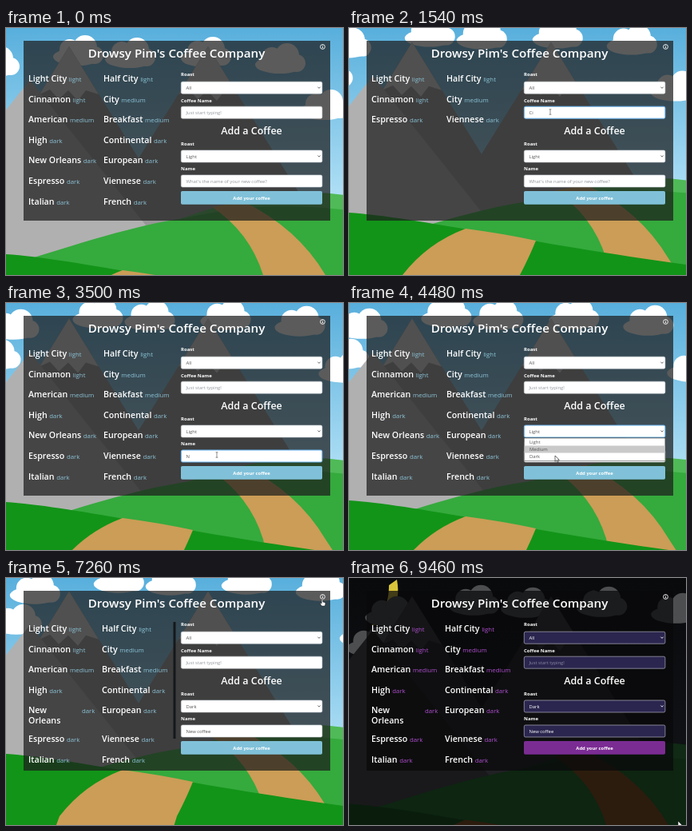
An HTML page for the animation above (9600 ms loop, 422 px wide and 309 px high).

```html
<!DOCTYPE html>
<html lang="en">
<head>
<meta charset="utf-8">
<title>Coffee list</title>
<style>
html, body { margin: 0; width: 100%; height: 100%; overflow: hidden; }
svg {
  display: block; width: 100vw; height: 100vh;
  font-family: "Open Sans", "Noto Sans", sans-serif; font-size: 5.9px;
  --top: #58afdc; --low: #b8e4f8; --cloud: #fff; --far: #4fba57; --back: #35aa3d;
  --front: #129418; --road: #cb9d56; --rockA: #979797; --rockB: #b0b0b0; --snow: #d8d8d8;
  --panel: rgba(28, 28, 29, .72); --field: #fff; --edge: #ced4da; --ink: #555;
  --hint: #92979c; --accent: #8cc3d7; --button: #80c1d9;
}
svg.night {
  --top: #090a0c; --low: #101216; --cloud: #4d4e50; --far: #102a15; --back: #0d2511;
  --front: #0a1d0d; --road: #2c1c0d; --rockA: #202124; --rockB: #19191b; --snow: #353638;
  --panel: rgba(9, 9, 11, .72); --field: #2a264f; --edge: #c9c7d5; --ink: #fff;
  --hint: #8e89a5; --accent: #b04fd0; --button: #7b2c93;
}
#clouds { fill: var(--cloud); }
#far { fill: var(--far); }
.back { fill: var(--back); }
.front { fill: var(--front); }
.road { fill: var(--road); }
.rockA { fill: var(--rockA); }
.rockB { fill: var(--rockB); }
.snow { fill: var(--snow); }
.panel { fill: var(--panel); }
.head { fill: #fff; font-weight: 600; text-anchor: middle; }
.label { fill: #fff; font-weight: 700; font-size: 6px; }
.field { fill: var(--field); stroke: var(--edge); stroke-width: .6; }
.field.focus { stroke: #67b2ee; stroke-width: 1; }
.value { fill: var(--ink); }
.value.hint { fill: var(--hint); }
.chevron { fill: none; stroke: var(--ink); stroke-width: .9; }
.button { fill: var(--button); }
.button.focus { stroke: #c9e3ec; stroke-width: .8; }
.item { fill: #fff; font-weight: 600; font-size: 10.7px; }
.roast { fill: var(--accent); font-weight: 400; font-size: 7.8px; }
#moon { display: none; fill: #d9c43a; }
.night #moon { display: inline; }
</style>
</head>
<body>
<svg id="stage" viewBox="0 0 422 309" preserveAspectRatio="none">
  <defs>
    <linearGradient id="sky" x2="0" y2="1">
      <stop offset="0" style="stop-color:var(--top)"/>
      <stop offset=".75" style="stop-color:var(--low)"/>
    </linearGradient>
    <clipPath id="listBox"><rect x="22" y="50" width="192" height="184"/></clipPath>
    <g id="puff">
      <ellipse cx="0" cy="6" rx="31" ry="11"/>
      <circle cx="-10" cy="-3" r="13"/>
      <circle cx="9" cy="-6" r="15"/>
      <circle cx="21" cy="4" r="11"/>
    </g>
    <g id="peak">
      <path class="rockA" d="M0 23L-166 290H166Z"/>
      <path class="snow" d="M0 23L-37 83l13-6 11 12 12-11 12 13 10-13 16 5Z"/>
    </g>
  </defs>
  <rect width="422" height="309" fill="url(#sky)"/>
  <path id="moon" d="M60 2C66 34 51 58 28 59C41 50 50 34 50 9Z"/>
  <g id="clouds"></g>
  <g id="rocks">
    <use href="#peak" x="253"/>
    <use href="#peak" x="79"/>
    <path class="rockB" d="M30 65L-160 303H220Z"/>
  </g>
  <path id="far" d="M190 250Q330 192 430 210V400H190Z"/>
  <g id="back">
    <path class="back" d="M-5 300C70 276 150 250 210 240S310 215 430 228V400H-5Z"/>
    <path class="road" d="M258 224Q305 255 322 309L335 370H440L400 309Q365 250 297 217Z"/>
  </g>
  <g id="front">
    <path class="front" d="M0 283C80 288 230 322 422 348V460H0Z"/>
    <path class="road" d="M146 303Q98 321 67 361L38 440H190L214 361Q226 338 234 318Q192 309 146 303Z"/>
  </g>
  <rect class="panel" x="22" y="16" width="384" height="225"/>
  <text class="head" x="213.5" y="36.5" font-size="15.2">Drowsy Pim's Coffee Company</text>
  <g fill="none" stroke="#fff" stroke-width=".9">
    <circle cx="396.5" cy="23.5" r="2.9"/>
    <path d="M396.5 23v2.2M396.5 21.4v.8"/>
  </g>
  <g clip-path="url(#listBox)"><g id="list"></g></g>
  <rect id="bar" x="209.5" y="55" width="3" height="146" fill="#15181b"/>
  <g id="form"></g>
  <g id="cursor"></g>
</svg>
<script>
const LOOP = 9600, FRAME = 140;
const TYPE = 3500, OPEN = 4340, PICK = 4720, ADD = 5300, NIGHT = 7680;
const $ = id => document.getElementById(id);

const coffees = [
  ['Light City', 'light'], ['Half City', 'light'], ['Cinnamon', 'light'], ['City', 'medium'],
  ['American', 'medium'], ['Breakfast', 'medium'], ['High', 'dark'], ['Continental', 'dark'],
  ['New Orleans', 'dark'], ['European', 'dark'], ['Espresso', 'dark'], ['Viennese', 'dark'],
  ['Italian', 'dark'], ['French', 'dark']
];
const added = ['New coffee', 'dark'];
const searches = [
  [0, '', /./], [1120, 'C', /c/i], [1540, 'Ci', /ci|sp|nn/i], [1820, 'Cin', /cin/i], [2240, '', /./]
];

// One vertical sway shared by the scenery; nearer layers follow it more.
const sway = [[0, 0], [1540, -52], [3500, -34], [4480, -36], [5860, -31], [7260, -63], [LOOP, 0]];
const depth = { rocks: .1, far: .35, back: .4, front: 1 };
const clouds = [[343, 40], [398, 98], [250, 32], [155, 33], [90, 30], [-15, 44], [-38, 82]];

// Pointer stops: arrival time, place, cursor
const stops = [
  [0, 425, 307, 'arrow'], [980, 252, 105, 'beam'], [3080, 264, 190, 'beam'],
  [4400, 258, 191, 'arrow'], [5160, 302, 212, 'hand'], [5800, 156, 181, 'arrow'],
  [7120, 396, 27, 'hand'], [9400, 412, 304, 'arrow']
];
const shapes = {
  arrow: '<path d="M0 0V7.4L1.8 5.7L3 8.6L4.3 8L3.1 5.3H5.4Z" fill="#fff" stroke="#111" stroke-width=".6"/>',
  beam: '<path d="M-1.4-3.2H1.4M0-3.2V3.2M-1.4 3.2H1.4" fill="none" stroke="#444" stroke-width=".6"/>',
  hand: '<path d="M-.8 0q.8-1 1.6 0v3l3 .7q.6 1.6-.5 4.3h-4L-2.8 4.6q1-.8 2 .4Z" fill="#fff" stroke="#111" stroke-width=".5"/>'
};

const clamp = p => Math.min(1, Math.max(0, p));
const mix = (a, b, p) => a + (b - a) * (1 - Math.cos(Math.PI * clamp(p))) / 2;
const within = (t, from, to) => t >= from && t < to;

function swayAt(t) {
  const i = sway.findIndex(k => k[0] > t);
  const [t0, y0] = sway[i - 1], [t1, y1] = sway[i];
  return mix(y0, y1, (t - t0) / (t1 - t0));
}

// The frame clock restarts after each shortened frame.
function step(t) {
  const from = [0, 4580, 5720, 9460].filter(s => s <= t).pop();
  return from + Math.floor((t - from) / FRAME) * FRAME;
}

const text = (cls, x, y, s) => `<text class="${cls}" x="${x}" y="${y}">${s}</text>`;

function listMarkup(rows, narrow) {
  let y = 67, out = '';
  rows.forEach(([name, roast], i) => {
    const x = i % 2 ? (narrow ? 120 : 122) : 28;
    const wrap = narrow && name.length > 10 && !(i % 2);
    if (wrap) {
      const [first, second] = name.split(' ');
      out += text('item', x, y, first) + text('item', x, y + 13, second) + text('roast', 95, y, roast);
    } else {
      out += text('item', x, y, `${name}<tspan class="roast" dx="2.6">${roast}</tspan>`);
    }
    if (i % 2) y += narrow && rows[i - 1][0].length > 10 ? 36 : 25.6;
  });
  return out;
}

function field(y, value, hint, focus, select) {
  return `<rect class="field ${focus ? 'focus' : ''}" x="219.3" y="${y}" width="176.6" height="15" rx="1.8"/>`
    + text(value ? 'value' : 'value hint', 225.5, y + 9.7, value || hint)
    + (select ? `<path class="chevron" d="M390.4 ${y + 6.5}l1.6 1.7 1.6-1.7"/>` : '');
}

function menu() {
  return '<rect x="219.3" y="169" width="176.6" height="28.5" fill="#fff" stroke="#555" stroke-width=".6"/>'
    + '<rect x="219.6" y="178.5" width="176" height="9" fill="#c9c9c9"/>'
    + ['Light', 'Medium', 'Dark'].map((s, i) => text('value', 226, 176.2 + i * 9, s)).join('');
}

function formMarkup(t, query) {
  const typed = t < TYPE ? 0 : 1 + Math.floor((t - TYPE) / 70);
  return text('label', 219, 60, 'Roast')
    + field(67.2, 'All', '', false, true)
    + text('label', 219, 92.8, 'Coffee Name')
    + field(98.2, query, 'Just start typing!', within(t, 980, 2940))
    + '<text class="head" x="307.5" y="133" font-size="12.5">Add a Coffee</text>'
    + text('label', 219, 147.2, 'Roast')
    + field(153, t < PICK ? 'Light' : 'Dark', '', within(t, OPEN, ADD), true)
    + text('label', 219, 178.4, 'Name')
    + field(184, added[0].slice(0, typed), "What's the name of your new coffee?", within(t, 3080, OPEN))
    + `<rect class="button ${within(t, ADD, 6840) ? 'focus' : ''}" x="219" y="204" width="177" height="16.8" rx="1.8"/>`
    + '<text class="head" x="307.5" y="214.6" style="font-weight:700">Add your coffee</text>'
    + (within(t, OPEN, PICK) ? menu() : '');
}

function put(id, markup) {
  const el = $(id);
  if (el.markup !== markup) el.innerHTML = el.markup = markup;
}

const move = (id, x, y) => $(id).setAttribute('transform', `translate(${x} ${y})`);

function drawPointer(t) {
  const i = stops.filter(s => s[0] <= t).length - 1;
  const [, x, y, kind] = stops[i];
  const [arrive, nextX, nextY] = stops[i + 1] || stops[i];
  const p = (t - arrive + 500) / 500;
  put('cursor', shapes[p > 0 ? 'arrow' : kind]);
  move('cursor', mix(x, nextX, p), mix(y, nextY, p));
}

function draw(t) {
  const y = swayAt(t);
  for (const id in depth) move(id, 0, y * depth[id]);
  move('clouds', t * .007, y * .45);
  $('stage').classList.toggle('night', t >= NIGHT);

  const [, query, match] = searches.filter(s => s[0] <= t).pop();
  const isAdded = t >= ADD;
  const rows = isAdded ? [...coffees, added] : coffees.filter(c => match.test(c[0]));
  put('list', listMarkup(rows, isAdded));
  move('list', 0, -24 * Math.sin(Math.PI * clamp((t - 5720) / 1120)) ** 2);
  $('bar').setAttribute('visibility', within(t, ADD, NIGHT) ? 'visible' : 'hidden');

  put('form', formMarkup(t, query));
  drawPointer(t);
}

$('clouds').innerHTML = clouds.map(([x, y]) => `<use href="#puff" x="${x}" y="${y}"/>`).join('');

const start = performance.now();
function tick() {
  draw(step((performance.now() - start) % LOOP));
  requestAnimationFrame(tick);
}
tick();
</script>
</body>
</html>
```
